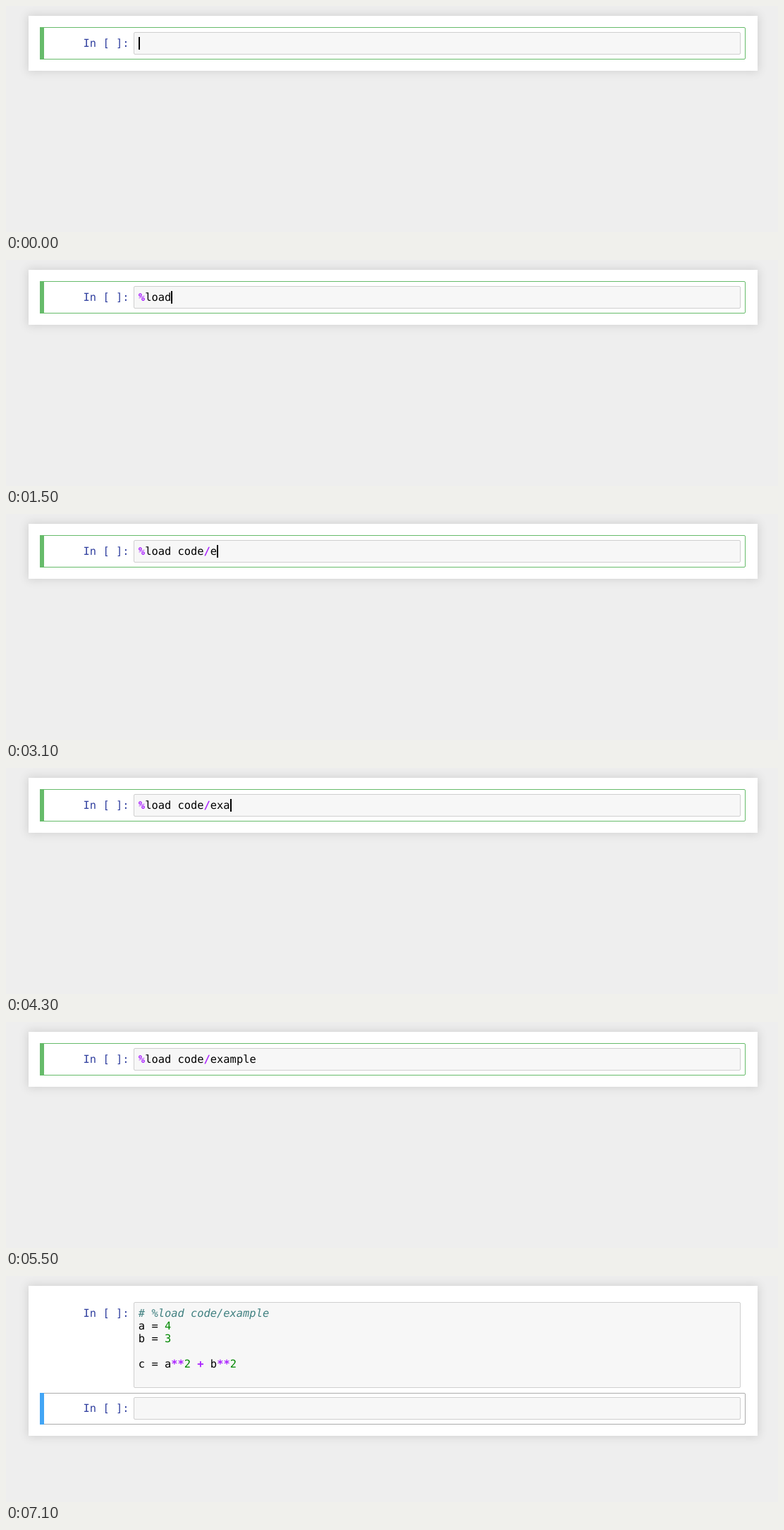
Animation of 1095x321 px, one loop 7.3 s. Source, as an HTML page:

```html
<!DOCTYPE html>
<html lang="en">
<head>
<meta charset="utf-8">
<title>Notebook: loading a script</title>
<style>
  html, body { margin: 0; width: 100%; height: 100%; overflow: hidden; background: #eee; }
  body {
    position: relative;
    font: 15.4px/18px "DejaVu Sans Mono", monospace;
    text-rendering: geometricPrecision;
  }
  div { position: absolute; box-sizing: border-box; white-space: pre; }
  .page {
    left: 32px; top: 14px; width: 1034px; height: 78px;
    background: #fff; box-shadow: 0 0 12px 1px rgba(87, 87, 87, .2);
  }
  .frame {
    left: 48px; top: 30px; width: 1001px; height: 46px;
    border: 1px solid #66bb6a; border-radius: 2px;
  }
  .frame::before {
    content: ""; position: absolute; left: -1px; top: -1px; bottom: -1px;
    width: 6px; background: #66bb6a;
  }
  .cell { left: 0; top: 37px; }
  .prompt { left: 109.6px; top: 7px; color: #303f9f; }
  .input {
    left: 181px; top: 0; width: 861px; height: 32px;
    background: #f7f7f7; border: 1px solid #cfcfcf; border-radius: 2px;
  }
  .code { left: 187.85px; top: 7px; color: #000; }
  .caret { width: 2px; height: 18px; top: 44px; background: #000; }
  .second { top: 172px; visibility: hidden; }

  .loaded .page { height: 213px; }
  .loaded .frame { top: 166px; height: 45px; }
  .loaded .first .input { height: 122px; }
  .loaded .second { visibility: visible; }
  .loaded .caret { top: 179px; }
  .command .frame { border-color: #ababab; }
  .command .frame::before { background: #42a5f5; }

  b { color: #a2f; }
  i { color: #408080; }
  u { color: #080; text-decoration: none; }
</style>
</head>
<body>
<div class="page"></div>
<div class="frame"></div>
<div class="cell first">
  <div class="prompt">In [ ]:</div>
  <div class="input"></div>
  <div class="code"></div>
</div>
<div class="cell second">
  <div class="prompt">In [ ]:</div>
  <div class="input"></div>
</div>
<div class="caret"></div>
<script>
  const LOOP = 7300, LOADED = 6100, COMMAND = 7100, BLINK = 500;
  const ADVANCE = 15.4 * 1233 / 2048, TEXT_LEFT = 187.85;
  const KEYS = "%load code/exan\bmple";
  const KEY_TIMES = [
    600, 1000, 1200, 1300, 1500, 1700, 1900, 2000, 2100, 2300,
    2700, 3100, 3400, 3600, 3900, 4300, 4600, 4800, 4900, 5000
  ];
  const SCRIPT = "a = 4\nb = 3\n\nc = a**2 + b**2\n";

  const code = document.querySelector(".code");
  const caret = document.querySelector(".caret");
  const highlight = text => text
    .replace(/\d+/g, "<u>$&</u>")
    .replace(/\*\*|[%+]|\/(?!u>)/g, "<b>$&</b>");
  const loadedHtml = "<i># %load code/example</i>\n" + highlight(SCRIPT);

  function typedAt(count) {
    let text = "";
    for (const key of KEYS.slice(0, count))
      text = key === "\b" ? text.slice(0, -1) : text + key;
    return text;
  }

  let shownHtml = null;
  function draw() {
    const t = performance.now() % LOOP;
    const loaded = t >= LOADED, command = t >= COMMAND;
    const count = KEY_TIMES.filter(time => time <= t).length;
    const text = typedAt(count);
    const lastInput = loaded ? LOADED : count ? KEY_TIMES[count - 1] : 0;

    document.body.classList.toggle("loaded", loaded);
    document.body.classList.toggle("command", command);
    const html = loaded ? loadedHtml : highlight(text);
    if (html !== shownHtml) code.innerHTML = shownHtml = html;

    const column = loaded ? 0 : text.length;
    caret.style.left = Math.round(TEXT_LEFT + column * ADVANCE) + "px";
    caret.style.visibility = t - lastInput < BLINK ? "visible" : "hidden";
    requestAnimationFrame(draw);
  }
  draw();
</script>
</body>
</html>
```
